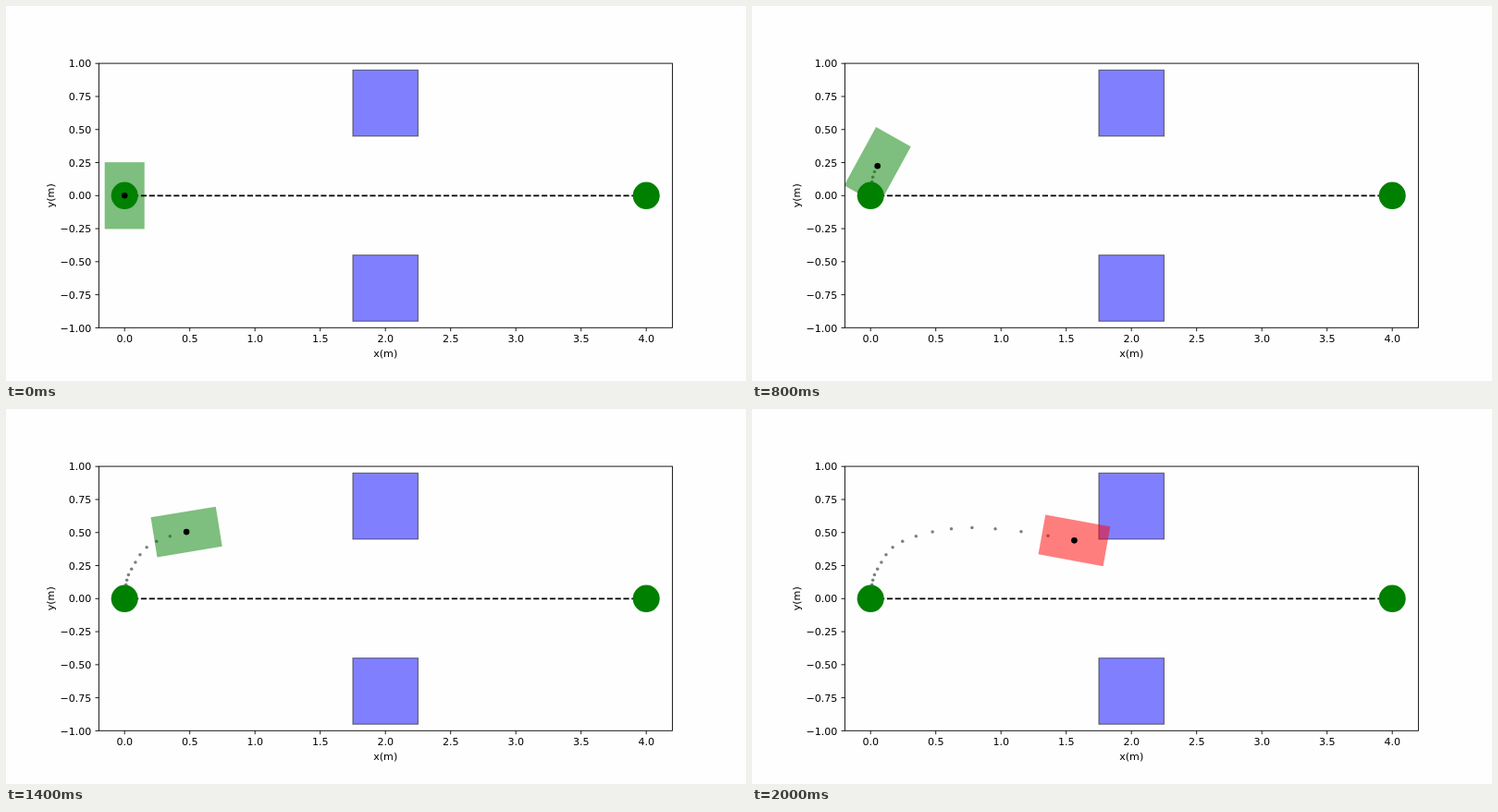
These frames come from a looping animation (800 px wide and 406 px high, 2.1 s). An HTML page with a canvas:

```html
<!DOCTYPE html>
<html lang="en">
<head>
<meta charset="utf-8">
<title>Path through a gap</title>
<style>
html, body { margin: 0; width: 100%; height: 100%; overflow: hidden; background: #fefefe; }
canvas { display: block; }
</style>
</head>
<body>
<canvas id="plot" width="800" height="406"></canvas>
<script>
const ctx = document.getElementById('plot').getContext('2d');
const UX = 141, UY = 143.1;
const px = x => 128.2 + UX * x;
const py = y => 205.3 - UY * y;
const LEFT = 100.4, TOP = 62.1, WIDTH = 620, HEIGHT = 286.2;
const STEP = 100, STEPS = 21, STEPS_PER_KEY = 4;

// Key poses: x and y in metres, heading in degrees
const keys = [
  [0, 0, 90], [.005, .074, 81], [.053, .224, 61], [.245, .434, 25],
  [.778, .537, -2.9], [1.562, .44, -10.3], [2.346, .261, -6]
];

function catmullRom(a, b, c, d, t) {
  return b + t / 2 * (c - a + t * (2 * a - 5 * b + 4 * c - d + t * (3 * (b - c) + d - a)));
}

// Mirroring the first key makes the robot start from rest
function poseAt(step) {
  const i = Math.floor(step / STEPS_PER_KEY);
  const t = step / STEPS_PER_KEY - i;
  const key = n => keys[Math.min(Math.abs(n), keys.length - 1)];
  return keys[0].map((_, j) =>
    catmullRom(key(i - 1)[j], key(i)[j], key(i + 1)[j], key(i + 2)[j], t));
}

function dot([x, y], r, color) {
  ctx.fillStyle = color;
  ctx.beginPath();
  ctx.arc(px(x), py(y), r, 0, 7);
  ctx.fill();
}

function line(x1, y1, x2, y2) {
  ctx.beginPath();
  ctx.moveTo(x1, y1);
  ctx.lineTo(x2, y2);
  ctx.stroke();
}

function robot([x, y, deg], color) {
  ctx.save();
  ctx.translate(px(x), py(y));
  ctx.scale(UX, -UY);
  ctx.rotate(deg * Math.PI / 180);
  ctx.fillStyle = color;
  ctx.fillRect(-.2525, -.1525, .505, .305);
  ctx.restore();
}

function obstacle(y) {
  const box = [px(1.75), py(y + .25), UX / 2, UY / 2];
  ctx.fillStyle = '#8080ff';
  ctx.fillRect(...box);
  ctx.strokeStyle = 'rgba(0,0,0,.5)';
  ctx.lineWidth = 1.1;
  ctx.strokeRect(...box);
}

function marker(x) {
  ctx.fillStyle = '#008000';
  ctx.beginPath();
  ctx.ellipse(px(x), py(0), .103 * UX, .103 * UY, 0, 0, 7);
  ctx.fill();
}

function axes() {
  const bottom = TOP + HEIGHT;
  ctx.strokeStyle = ctx.fillStyle = '#000';
  ctx.lineWidth = .9;
  ctx.font = '11.1px "DejaVu Sans", sans-serif';
  ctx.strokeRect(LEFT, TOP, WIDTH, HEIGHT);
  ctx.textAlign = 'center';
  for (let x = 0; x <= 4; x += .5) {
    line(px(x), bottom, px(x), bottom + 3.9);
    ctx.fillText(x.toFixed(1), px(x), 364.1);
  }
  ctx.fillText('x(m)', 410.2, 380.2);
  ctx.save();
  ctx.translate(52, 205.3);
  ctx.rotate(-Math.PI / 2);
  ctx.fillText('y(m)', 0, 0);
  ctx.restore();
  ctx.textAlign = 'right';
  for (let y = -1; y <= 1; y += .25) {
    line(LEFT - 3.9, py(y), LEFT, py(y));
    ctx.fillText(y.toFixed(2).replace('-', '\u2212'), 92.4, py(y) + 4.1);
  }
}

function draw(now) {
  const step = Math.floor(now / STEP) % STEPS;
  const pose = poseAt(step);
  const crashed = step === STEPS - 1;
  ctx.fillStyle = '#fefefe';
  ctx.fillRect(0, 0, 800, 406);
  obstacle(.7);
  obstacle(-.7);
  for (let i = 0; i < step; i++) dot(poseAt(i), 1.75, 'rgba(0,0,0,.5)');
  robot(pose, crashed ? 'rgba(255,0,0,.5)' : 'rgba(0,128,0,.5)');
  ctx.strokeStyle = '#000';
  ctx.lineWidth = 1.67;
  ctx.setLineDash([6.17, 2.67]);
  line(px(0), py(0), px(4), py(0));
  ctx.setLineDash([]);
  marker(0);
  marker(4);
  dot(pose, 3.3, '#000');
  axes();
}

const start = performance.now();
function tick() {
  draw(performance.now() - start);
  requestAnimationFrame(tick);
}
tick();
</script>
</body>
</html>
```
